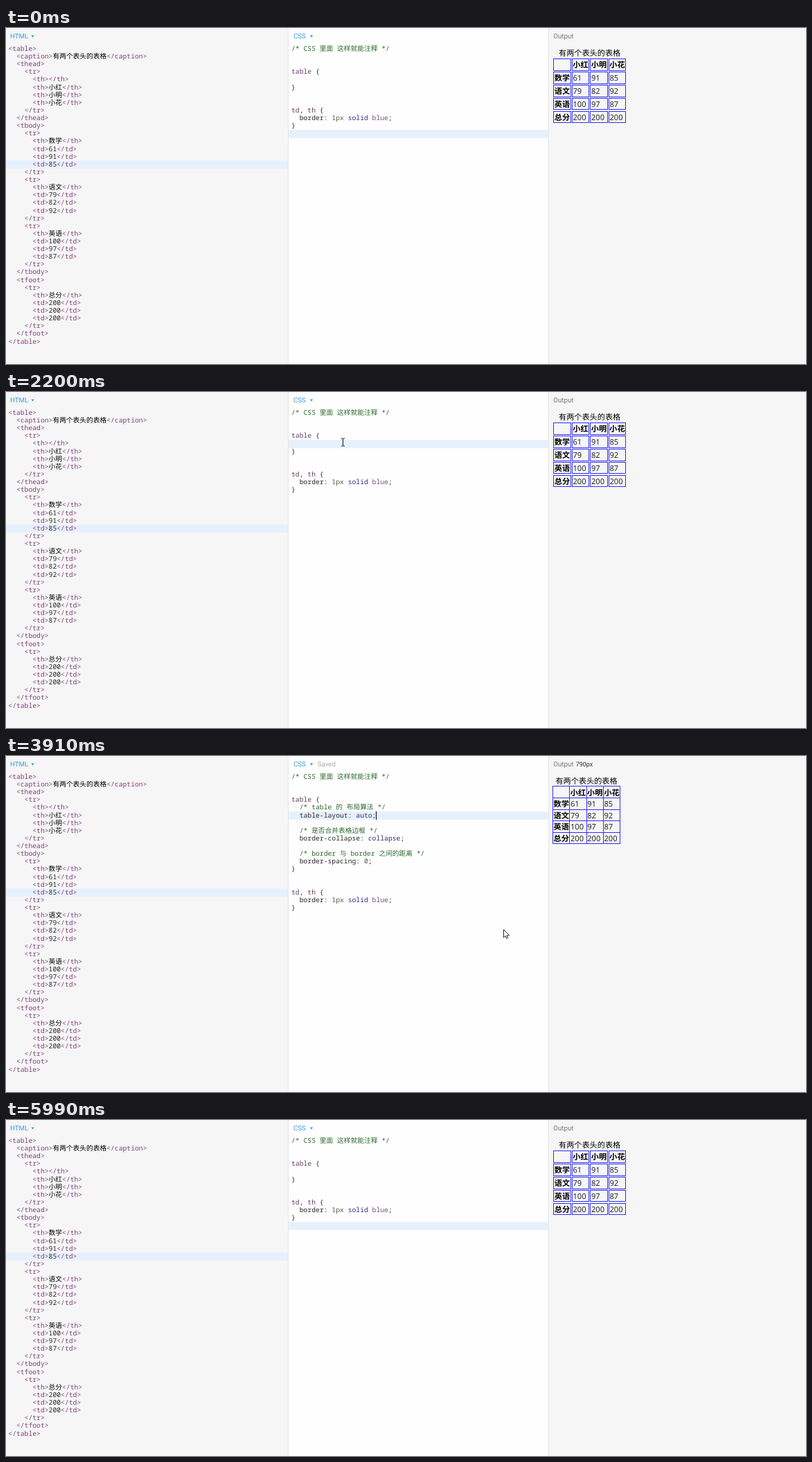
Recreate the animation shown at these times as an HTML page with a canvas. Size 1155x485 px, loop 6820 ms.

```html
<!DOCTYPE html>
<html lang="zh-CN">
<head>
<meta charset="utf-8">
<style>
html, body { margin: 0; width: 100%; height: 100%; overflow: hidden; background: #f6f6f6; }
canvas { display: block; }
</style>
</head>
<body>
<canvas id="stage" width="1155" height="485"></canvas>
<script>
const ctx = document.getElementById('stage').getContext('2d');
const LOOP = 6820, LINE = 11.12, TOP = 25;
const CJK = '"Noto Sans CJK SC", "Noto Sans CJK", sans-serif';
const CODE = '9.72px "Noto Sans Mono", ' + CJK;
const LABEL = '9.7px Roboto, sans-serif';
const PAGE = '11.15px "Noto Sans", ' + CJK;
const PURPLE = '#823f7a', INK = '#2a2a2a', BLUE = '#3a9be6', PALE = '#f6f6f6';

const subjects = [['数学', 61, 91, 85], ['语文', 79, 82, 92], ['英语', 100, 97, 87], ['总分', 200, 200, 200]];
const heads = ['', '小红', '小明', '小花'];
const caption = '有两个表头的表格';

function htmlSource() {
  const row = ([name, ...marks]) => ['    <tr>', `      <th>${name}</th>`,
    ...marks.map(m => `      <td>${m}</td>`), '    </tr>'];
  return ['<table>', `  <caption>${caption}</caption>`, '  <thead>', '    <tr>',
    ...heads.map(h => `      <th>${h}</th>`), '    </tr>', '  </thead>',
    '  <tbody>', ...subjects.slice(0, 3).flatMap(row), '  </tbody>',
    '  <tfoot>', ...row(subjects[3]), '  </tfoot>', '</table>'];
}

const intro = ['/* CSS 里面 这样就能注释 */', '', '', 'table {'];
const outro = ['}', '', '', 'td, th {', '  border: 1px solid blue;', '}', ''];
const rules = [
  '  /* table 的 布局算法 */', '  table-layout: auto;', '',
  '  /* 是否合并表格边框 */', '  border-collapse: collapse;', '',
  '  /* border 与 border 之间的距离 */', '  border-spacing: 0;'];
const html = htmlSource();
const cssShort = [...intro, '', ...outro];
const cssLong = [...intro, ...rules, ...outro];

function htmlColor(s) {
  return s[0] === '<' ? PURPLE : /[^\x00-\x7f]/.test(s) ? '#000' : INK;
}
function cssColor(s) {
  if (s.startsWith('/*')) return '#2c692c';
  if (/^(table|td|th)$/.test(s)) return '#6a4068';
  if (/^\d/.test(s)) return '#50664a';
  if (/^(solid|auto|collapse)$/.test(s)) return '#2f2f78';
  return s === 'blue' ? '#75507f' : INK;
}
const htmlToken = /<[^>]*>|[^<]+/g;
const cssToken = /\/\*.*\*\/|[\w-]+|[^\w-]/g;

function text(s, x, y, font, color, align = 'left') {
  ctx.font = font;
  ctx.fillStyle = color;
  ctx.textAlign = align;
  ctx.fillText(s, x, y);
}
function rect(x, y, w, h, color) {
  ctx.fillStyle = color;
  ctx.fillRect(x, y, w, h);
}
function code(lines, x0, token, color) {
  lines.forEach((line, i) => {
    let x = x0;
    for (const part of line.match(token) || []) {
      text(part, x, TOP + 8 + i * LINE, CODE, color(part));
      x += ctx.measureText(part).width;
    }
  });
}
const rowTop = row => Math.floor(TOP + row * LINE);
function activeLine(x, w, row) {
  rect(x, rowTop(row), w, 12, '#e7f1fe');
}
function menu(s, x, arrowX) {
  text(s, x, 15.3, LABEL, BLUE);
  ctx.beginPath();
  ctx.moveTo(arrowX - 2.2, 10.5);
  ctx.lineTo(arrowX + 2.2, 10.5);
  ctx.lineTo(arrowX, 13.7);
  ctx.fill();
}

function resultTable(merged) {
  const w = 24.3, h = 16.6, gap = merged ? 0 : 2.2;
  const [x0, y0] = merged ? [789, 43.4] : [790.3, 44.3];
  text(caption, merged ? 838 : 842.6, 40.3, PAGE, '#000', 'center');
  ctx.strokeStyle = '#3030f6';
  ctx.lineWidth = 1;
  [heads, ...subjects].forEach((row, j) => row.forEach((cell, i) => {
    const left = x0 + i * (w + gap), top = y0 + j * (h + gap);
    const x = Math.round(left), y = Math.round(top);
    ctx.strokeRect(x + .5, y + .5, Math.round(left + w) - x, Math.round(top + h) - y);
    const base = top + h / 2 + 4.8;
    if (i && j) text(cell, left + 1.6, base, PAGE, INK);
    else text(cell, left + w / 2 + .5, base, 'bold ' + PAGE, '#000', 'center');
  }));
}

// Pointer moves: start, end, steps, then two or three points
const moves = [
  [310, 970, 9, [1038, 456], [466, 168]],
  [1030, 1660, 9, [466, 168], [420, 75]],
  [1730, 1890, 3, [420, 75], [486, 72]],
  [3050, 3360, 5, [486, 72], [576, 82]],
  [3600, 4220, 9, [576, 82], [718, 250], [1117, 442]],
  [4300, 4530, 4, [1117, 442], [1117, 449]],
  [4680, 5140, 7, [1117, 449], [1136, 485]]];

function pointerAt(t) {
  if (t < 310 || t >= 5140) return null;
  const [start, end, steps, a, b, c] = moves.filter(m => m[0] <= t).pop();
  const q = Math.min(1, Math.floor((t - start) / (end - start) * (steps - 1) + 1e-6) / (steps - 1));
  const p = q * q * (3 - 2 * q);
  return [0, 1].map(k => c
    ? a[k] * (1 - p) * (1 - 2 * p) + b[k] * 4 * p * (1 - p) + c[k] * p * (2 * p - 1)
    : a[k] + (b[k] - a[k]) * p);
}

const arrow = new Path2D('M0 0V11.6L2.7 9.2L4.4 13L6.2 12.2L4.5 8.5H8.2Z');
const beam = new Path2D('M-2.5 -5.5H-.7L0 -5L.7 -5.5H2.5M0 -5V5M-2.5 5.5H-.7L0 5L.7 5.5H2.5');

function drawPointer([x, y], codeBottom) {
  const overCode = x > 408 && x < 783 && y < codeBottom;
  ctx.save();
  ctx.translate(Math.round(x) + .5, Math.round(y) + .5);
  ctx.lineWidth = overCode ? 1 : .9;
  ctx.strokeStyle = '#111';
  if (!overCode) {
    ctx.fillStyle = '#fff';
    ctx.fill(arrow);
  }
  ctx.stroke(overCode ? beam : arrow);
  ctx.restore();
}

// Caret blinks every 530 ms from the latest reset
function caretOn(t) {
  if (t < 600 || t >= 4680) return false;
  const reset = [600, 1660, 2580, 3450].filter(s => s <= t).pop();
  return Math.floor((t - reset) / 530) % 2 === 0;
}

const ramp = (t, a, b) => Math.max(0, Math.min(1, (t - a) / (b - a)));

function draw(t) {
  const pasted = t >= 2580 && t < 5990;
  const outputFocus = t >= 4680 && t < 5990;
  const css = pasted ? cssLong : cssShort;
  const row = pasted ? (t < 3450 ? 11 : 5) : t >= 1660 && t < 2580 ? 4 : 11;

  rect(0, 0, 1155, 485, PALE);
  rect(408, 0, 375, 485, outputFocus ? PALE : '#fefefe');
  rect(783, 0, 372, 485, outputFocus ? '#fefefe' : PALE);
  activeLine(0, 407, 15);
  activeLine(408, 375, row);
  rect(407, 0, 1, 485, '#e6e6e6');
  rect(783, 0, 1, 485, '#e6e6e6');

  menu('HTML', 6, 38.6);
  menu('CSS', 415, 441);
  text('Output', 790.3, 15.3, LABEL, '#777');
  ctx.globalAlpha = ramp(t, 3000, 3290) * (1 - ramp(t, 4680, 5140));
  text('Saved', 449.7, 15.3, LABEL, '#aaa');
  ctx.globalAlpha = t < 2740 ? 0 : 1 - ramp(t, 4680, 5140);
  text('790px', 822.7, 15.3, '9px Roboto, sans-serif', INK);
  ctx.globalAlpha = 1;

  code(html, 3.3, htmlToken, htmlColor);
  code(css, 412, cssToken, cssColor);
  resultTable(t >= 2740 && t < 5990);

  if (caretOn(t)) {
    ctx.font = CODE;
    const x = 412 + ctx.measureText(css[row]).width;
    rect(Math.round(x), rowTop(row), 1, 12, '#000');
  }
  const pointer = pointerAt(t);
  if (pointer) drawPointer(pointer, pasted ? 225 : 158);
}

ctx.textRendering = 'geometricPrecision';
const begin = performance.now();
function tick() {
  draw((performance.now() - begin) % LOOP);
  requestAnimationFrame(tick);
}
tick();
</script>
</body>
</html>
```
